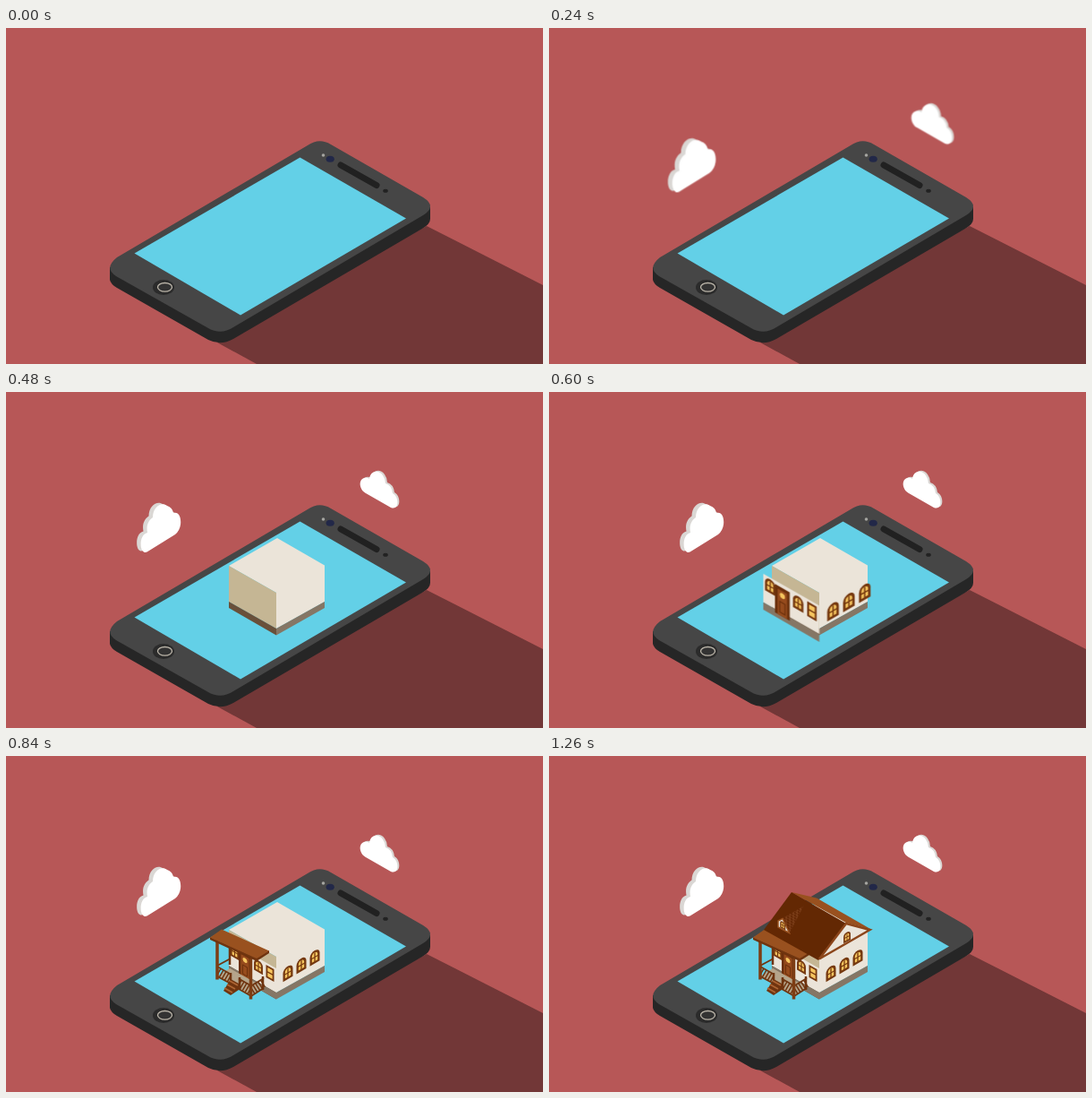
Recreate the animation shown at these times as an HTML page without scripts. Size 600 by 375 pixels, loop 2160 ms.

```html
<!DOCTYPE html>
<html lang="en">
<head>
<meta charset="utf-8">
<title>House on a phone</title>
<style>
html, body { margin: 0; height: 100%; overflow: hidden; background: #b75757; }
svg { display: block; width: 100vw; height: 100vh; }

/* Each part drops onto the scene: it starts large and shrinks in 60 ms steps. */
.part { animation: 2160ms step-end infinite; }
.clouds { animation-name: clouds; transform-origin: 294px 130px; }
.walls { animation-name: walls; transform-origin: 302.5px 217px; }
.openings { animation-name: openings; transform-origin: 302px 230px; }
.porch { animation-name: porch; transform-origin: 261px 232px; }
.roof { animation-name: roof; transform-origin: 297px 194px; }

@keyframes clouds {
  0% { opacity: 0; }
  2.77% { opacity: .4; transform: scale(1.5); }
  5.55% { opacity: .8; transform: scale(1.36); }
  8.33% { opacity: 1; transform: scale(1.23); }
  11.11% { transform: scale(1.09); }
  13.88% { opacity: 1; transform: none; }
}
@keyframes walls {
  0% { opacity: 0; }
  13.88% { opacity: .4; transform: scale(1.41); }
  16.66% { opacity: .8; transform: scale(1.27); }
  19.44% { opacity: 1; transform: scale(1.14); }
  22.22% { opacity: 1; transform: none; }
}
@keyframes openings {
  0% { opacity: 0; }
  24.99% { opacity: .5; transform: scale(1.36); }
  27.77% { opacity: 1; transform: scale(1.18); }
  30.55% { opacity: 1; transform: none; }
}
@keyframes porch {
  0% { opacity: 0; }
  36.1% { opacity: .8; transform: scale(1.18); }
  38.88% { opacity: 1; transform: none; }
}
@keyframes roof {
  0% { opacity: 0; }
  41.66% { opacity: .4; transform: scale(1.45); }
  44.44% { opacity: .8; transform: scale(1.32); }
  47.22% { opacity: 1; transform: scale(1.18); }
  49.99% { transform: scale(1.045); }
  52.77% { opacity: 1; transform: none; }
}
</style>
</head>
<body>
<svg viewBox="0 0 600 375" preserveAspectRatio="none">
  <defs>
    <path id="cloudLeft" d="M154 178.5C149 176 149 159 158 157C156 147 161 142 164 140C164 128 174 122 180 127Q186 129 187 135C193 133 196 140 195 148Q194 155 189 159L160 177Q156 180 154 178.5Z"/>
    <path id="cloudRight" d="M402 113C395 110 393 98 400 96Q404 95 406 97C407 88 416 86 421 93Q424 97 424 102Q431 104 432 113C437 116 438 122 437 126Q435 131 430 129Z"/>
    <g id="arch">
      <path fill="#75380f" d="M-5.5 7V-2a5.5 5.5 0 0 1 11 0V7z"/>
      <path fill="#f6c55f" d="M-3.2 4.5V-2a3.2 3.2 0 0 1 6.4 0V4.5z"/>
      <path stroke="#75380f" stroke-width="1.3" d="M0-5V5M-4 0H4"/>
    </g>
    <pattern id="shingles" width="4" height="3" patternUnits="userSpaceOnUse" patternTransform="skewY(28)">
      <path fill="#642805" d="M0 0H4V3H0z"/>
      <path fill="none" stroke="#8d5228" stroke-width=".7" d="M0 0H4M1 0V3"/>
    </pattern>
  </defs>

  <path fill="#b75757" d="M0 0H600V375H0z"/>
  <path fill="#723737" d="M470 221L600 287V375H280L236 351z"/>

  <g id="phone">
    <path fill="#262626" d="M116 267V281Q117 286 124 290L226 348Q240 355 254 347L465 224Q474 219 474 213V200z"/>
    <path fill="#464646" d="M124 256L337 131Q350 122 363 130L466 189Q482 199 466 209L254 334Q240 343 226 335L123 277Q109 268 124 256z"/>
    <path fill="#63d0e7" d="M328.500 144.500L447 212.500L262 320.500L143.500 251.500z"/>
    <ellipse cx="176" cy="289.500" rx="12" ry="8.500" fill="#2b2b2b"/>
    <ellipse cx="177.500" cy="289.300" rx="8" ry="4.800" fill="#333" stroke="#bbb5a9" stroke-width="1.300"/>
    <circle cx="354.500" cy="142" r="1.800" fill="#a5a5a0"/>
    <ellipse cx="362.200" cy="146.300" rx="4.600" ry="3.500" fill="#222848"/>
    <path stroke="#212121" stroke-width="7" stroke-linecap="round" d="M374 153L414 175.500"/>
    <ellipse cx="424" cy="181.800" rx="2.800" ry="2" fill="#222"/>
  </g>

  <g class="part clouds">
    <use href="#cloudLeft" x="-4.500" y="-1.500" fill="#dad7d4"/>
    <use href="#cloudLeft" fill="#fff"/>
    <use href="#cloudRight" x="2" y="-1" fill="#dad7d4"/>
    <use href="#cloudRight" fill="#fff"/>
  </g>

  <g class="part walls">
    <path fill="#ebe4d9" d="M303 163L356 193.500V234L302 264V224L249 194z"/>
    <path fill="#c5b694" d="M249 194L302 224V264L249 234z"/>
    <path fill="#69503a" d="M249 234L302 264V271.500L249 241z"/>
    <path fill="#857665" d="M302 264L356 234V241L302 271.500z"/>
  </g>

  <g class="part openings">
    <path fill="#ebe4d9" d="M249 207L302 237V264L249 234z"/>
    <path fill="#857665" d="M249 234L302 264V271.500L249 241z"/>
    <use href="#arch" transform="translate(255.500 219) skewY(30) scale(.9)"/>
    <g transform="translate(267 233.500) skewY(30)">
      <path fill="#6b300c" d="M-7-13H7V14H-7z"/>
      <path fill="#964b1d" d="M-4.500-10H4.500V14H-4.500z"/>
      <path fill="none" stroke="#6b300c" d="M-2.500 1H2.500V11H-2.500z"/>
      <circle cy="-5.500" r="2.500" fill="#f6c55f"/>
    </g>
    <use href="#arch" transform="translate(282 235) skewY(30) scale(.9)"/>
    <g transform="translate(295 242.500) skewY(30)">
      <path fill="#75380f" d="M-4.500-7H4.500V7H-4.500z"/>
      <path fill="#f6c55f" d="M-2.700-5H2.700V-.7H-2.700zM-2.700.7H2.700V5H-2.700z"/>
    </g>
    <use href="#arch" transform="translate(315 242) skewY(-30)"/>
    <use href="#arch" transform="translate(330 233.200) skewY(-30)"/>
    <use href="#arch" transform="translate(345 224.500) skewY(-30)"/>
  </g>

  <g class="part porch">
    <path fill="#b5a58b" d="M236 246L250 237L288 258L274 268z"/>
    <g fill="none" stroke="#6f340f">
      <path stroke-width="1.800" d="M236 234L250 226.500M236 235L251 243.500M260 248.500L274 256.500L288 248M236 246L251 254M260 260L274 268L288 259"/>
      <path stroke-width="9" stroke-dasharray="1.500 1.900" d="M237 241L251 249M260 254L274 262L288 253.500"/>
      <path stroke-width="2.500" d="M287 246V261M251 242V253M261 247V260M250 214V233"/>
    </g>
    <path fill="#6f340f" d="M251 249L260 254V261L251 267L243 262z"/>
    <path stroke="#ad6533" stroke-width="1.700" d="M250 251L259 256M247 255L256 260M244 259L253 264"/>
    <path stroke="#7d3d14" stroke-width="3.500" d="M236 204V249.500M273.500 226V271.500"/>
    <path fill="#6f340f" d="M228 202L280 225L294 217V220L280 229L228 205z"/>
    <path fill="#99511f" d="M228 202.500L241 193.500L294 217.500L280 226z"/>
  </g>

  <g class="part roof">
    <path fill="#ebe4d9" d="M332 188L357 195L304 225z"/>
    <path fill="#99511f" d="M271 152L299 158.500L360 193.500L332 186z"/>
    <path fill="#632803" d="M271 152L332 187L301 228L240 194z"/>
    <path fill="none" stroke="#8b451a" stroke-width="2.500" d="M358.500 194L332 187L302 226.500z"/>
    <use href="#arch" transform="translate(333 202) skewY(-28) scale(.72)"/>
    <path fill="url(#shingles)" d="M261 181L284.500 167.500L269 197z"/>
    <path fill="#ebe4d9" stroke="#99511f" stroke-width="1.500" d="M261 181.500L256 184V191L268.500 197.500z"/>
    <use href="#arch" transform="translate(261.200 189) skewY(28) scale(.55)"/>
  </g>
</svg>
</body>
</html>
```
